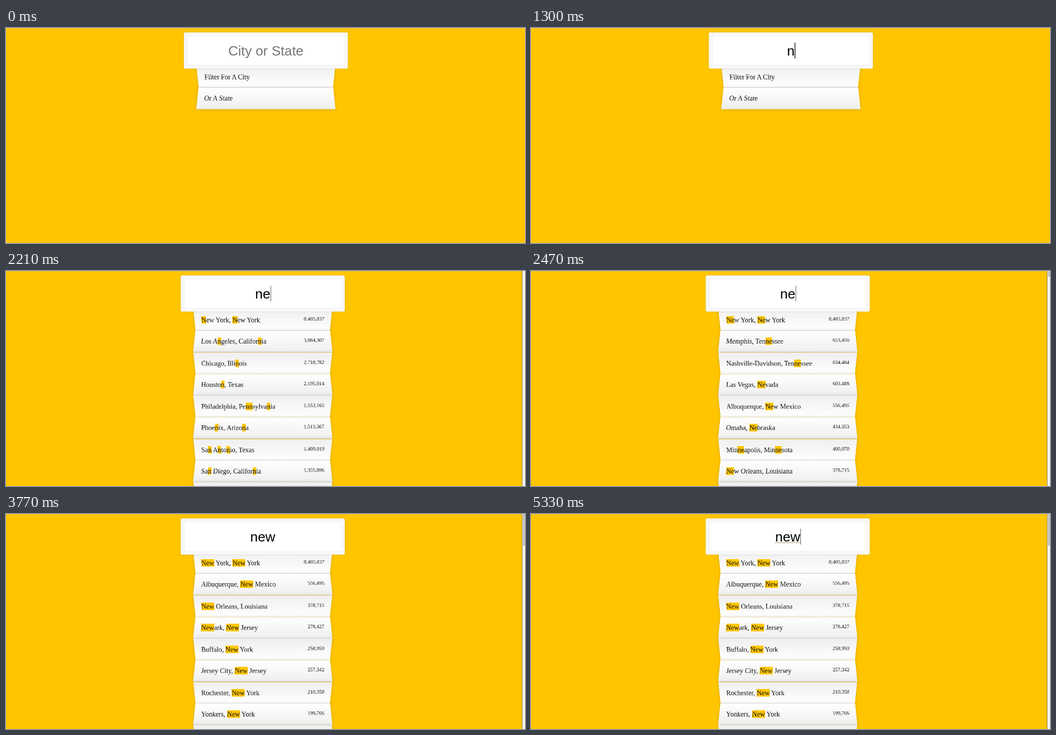
Recreate the animation shown at these times as an HTML page. Size 1000 by 414 pixels, loop 5.59 s.

```html
<!DOCTYPE html>
<html lang="en">
<head>
<meta charset="utf-8">
<title>City type-ahead</title>
<style>
html, body { margin: 0; width: 100%; height: 100%; overflow: hidden; background: #ffc600; }
#stage { position: absolute; left: 0; top: 0; width: 1000px; height: 414px; overflow: hidden; }
#stage::before { content: ""; position: absolute; left: 0; top: 0; width: 100%; height: 1px; background: #e3b93c; }

#form {
  position: absolute; left: 368.9px; top: 0; width: 400px;
  transform: scale(.6585); transform-origin: 0 0;
  font: 20px/22px "Liberation Serif", "Times New Roman", serif; color: #111;
}
.scrolls #form { left: 363.4px; }

#field {
  position: absolute; left: -40px; top: 13px; z-index: 2; box-sizing: border-box;
  width: 480px; height: 106px; border: 10px solid #f7f7f7; border-radius: 5px;
  background: #fff; text-align: center; color: #000;
  font: 40px/86px "Liberation Sans", Arial, sans-serif;
  box-shadow: 0 0 5px rgba(0,0,0,.12), inset 0 0 2px rgba(0,0,0,.19);
}
#query { position: relative; }
.checked #query { text-decoration: underline dotted #7a5a10 1.6px; text-underline-offset: 3px; }
#hint { position: absolute; left: 0; width: 100%; color: #757575; }
#caret { position: absolute; top: 20px; width: 1.6px; height: 46px; background: #000; }

#list { position: absolute; left: 0; top: 109px; width: 400px; margin: 0; padding: 0; list-style: none; }
#list li {
  box-sizing: border-box; height: 63.25px; padding: 20px;
  display: flex; justify-content: space-between; white-space: nowrap;
  border-bottom: 1px solid #d8d8d8; box-shadow: 0 0 10px rgba(0,0,0,.14);
}
#list li:nth-child(even) {
  transform: perspective(100px) rotateX(3deg) translateY(2px) scale(1.001);
  background: linear-gradient(to bottom, #fff, #efefef);
}
#list li:nth-child(odd) {
  transform: perspective(100px) rotateX(-3deg) translateY(3px);
  background: linear-gradient(to top, #fff, #efefef);
}
.count { font-size: 15px; line-height: 17px; }
mark { background: #ffc600; color: inherit; }

#bar { position: absolute; left: 994px; top: 0; width: 6px; height: 414px; box-sizing: border-box;
  background: #f3f3f3; border-left: 1px solid #94762a; display: none; }
.scrolls #bar { display: block; }
#thumb { position: absolute; left: 1px; top: 0; width: 4px; background: #c1c1c1; }
</style>
</head>
<body>
<div id="stage">
  <div id="form">
    <div id="field"><span id="hint">City or State</span><span id="query"></span><i id="caret"></i></div>
    <ul id="list"></ul>
  </div>
  <div id="bar"><div id="thumb"></div></div>
</div>
<script>
const LOOP = 5590;
const $ = id => document.getElementById(id);

// "place|population" rows shown for each search term
const results = {
  "": ["Filter For A City|", "Or A State|"],
  n: ["New York, New York|8,405,837", "Los Angeles, California|3,884,307", "Chicago, Illinois|2,718,782",
    "Houston, Texas|2,195,914", "Philadelphia, Pennsylvania|1,553,165", "Phoenix, Arizona|1,513,367",
    "San Antonio, Texas|1,409,019", "San Diego, California|1,355,896", "|"],
  ne: ["New York, New York|8,405,837", "Memphis, Tennessee|653,450", "Nashville-Davidson, Tennessee|634,464",
    "Las Vegas, Nevada|603,488", "Albuquerque, New Mexico|556,495", "Omaha, Nebraska|434,353",
    "Minneapolis, Minnesota|400,070", "New Orleans, Louisiana|378,715", "|"],
  new: ["New York, New York|8,405,837", "Albuquerque, New Mexico|556,495", "New Orleans, Louisiana|378,715",
    "Newark, New Jersey|278,427", "Buffalo, New York|258,959", "Jersey City, New Jersey|257,342",
    "Rochester, New York|210,358", "Yonkers, New York|199,766", "|"]
};
const thumbHeight = { "": 0, n: 0, ne: 11, new: 61 };

// [start time, value] tracks
const typed = [[0, ""], [1300, "n"], [2210, "ne"], [3120, "new"]];
const listed = [[0, ""], [1560, "n"], [2470, "ne"], [3380, "new"]];
const caretOn = [[0, false], [390, true], [1040, false], [1300, true], [1560, false], [2210, true],
  [2730, false], [3120, true], [3770, false], [4290, true], [4810, false], [5330, true]];
const CHECKED_AT = 4160;

const valueAt = (track, t) => track.filter(([start]) => start <= t).pop()[1];

function showList(term) {
  const highlight = s => term ? s.replace(new RegExp(term, "gi"), "<mark>$&</mark>") : s;
  $("list").innerHTML = results[term].map(row => {
    const [place, count] = row.split("|");
    return `<li><span>${highlight(place)}</span><span class="count">${count}</span></li>`;
  }).join("");
  $("stage").classList.toggle("scrolls", term !== "");
  $("thumb").style.height = thumbHeight[term] + "px";
}

function showQuery(text) {
  $("query").textContent = text;
  $("hint").hidden = text !== "";
  $("caret").style.left = 230 + $("query").offsetWidth / 2 + "px";
}

let shownList, shownQuery;
function draw(t) {
  const term = valueAt(listed, t), text = valueAt(typed, t);
  if (term !== shownList) showList(shownList = term);
  if (text !== shownQuery) showQuery(shownQuery = text);
  $("caret").hidden = !valueAt(caretOn, t);
  $("stage").classList.toggle("checked", t >= CHECKED_AT);
}

const begin = performance.now();
function tick() {
  draw((performance.now() - begin) % LOOP);
  requestAnimationFrame(tick);
}
tick();
</script>
</body>
</html>
```
